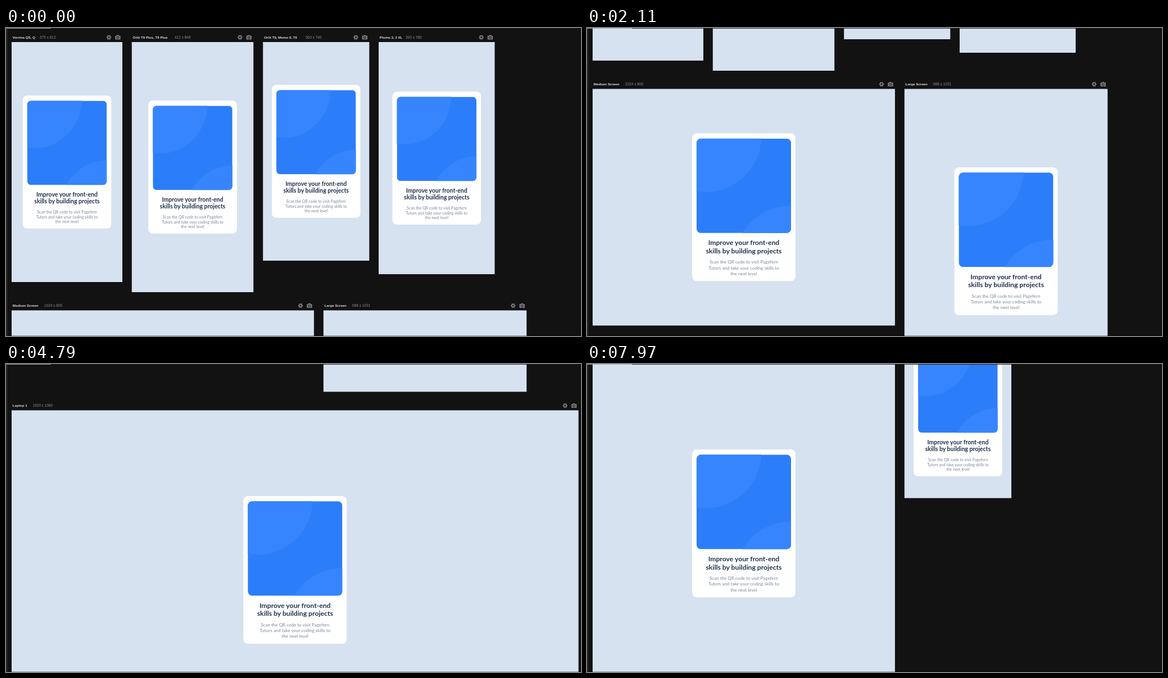
Animation, 1023 px wide and 548 px high, one loop 8 s. Source, as an HTML page:

```html
<!DOCTYPE html>
<html lang="en">
<head>
<meta charset="utf-8">
<title>Responsive preview</title>
<style>
  html, body { margin: 0; width: 100%; height: 100%; overflow: hidden; background: #121212; }
  svg { display: block; width: 1023px; height: 548px; }
  .name, .size { font: bold 6.2px "Liberation Sans", Arial, sans-serif; fill: #dcdcdc; }
  .size { font-weight: normal; font-size: 6.5px; fill: #8b8b8b; }
  .heading, .copy { font-family: Lato, sans-serif; text-anchor: middle; }
  .heading { font-weight: bold; fill: #1f314f; }
  .copy { fill: #7b879d; }
  .icon { fill: #787878; }
</style>
</head>
<body>
<svg xmlns="http://www.w3.org/2000/svg">
  <defs>
    <g id="gear" class="icon">
      <circle r="2.4" fill="none" stroke="#787878" stroke-width="1.9"/>
      <circle r="3.7" fill="none" stroke="#787878" stroke-width="1.3" pathLength="12" stroke-dasharray="1 1" stroke-dashoffset=".5"/>
    </g>
    <g id="camera" class="icon">
      <path d="M-4-3h2l1-1.2h2l1 1.2h2q.7 0 .7.7v5.6q0 .7-.7.7h-8q-.7 0-.7-.7v-5.6q0-.7.7-.7z"/>
      <circle cy=".5" r="2.3" fill="#121212"/>
      <circle cy=".5" r="1.4"/>
    </g>
    <clipPath id="rounded"><rect width="100" height="100" rx="4.8"/></clipPath>
    <g id="panel" clip-path="url(#rounded)">
      <rect width="100" height="100" fill="#2c7dfa"/>
      <g fill="#3685ff">
        <circle cx="10" cy="-2" r="58.5"/>
        <circle cx="99.5" cy="129.3" r="58.5"/>
      </g>
    </g>
  </defs>
  <g id="world"></g>
  <path d="M1.5 0V548" stroke="#3a3a3a"/>
  <path d="M0 .5H1023" stroke="#1c1c1c"/>
  <path d="M0 .5H80" stroke="#a5a5a5"/>
  <path d="M0 547.5H1023" stroke="#000" stroke-opacity=".35"/>
</svg>
<script>
const SCALE = 0.5253, TICK = 87.65, LOOP = 8000;
const world = document.getElementById('world');

const HEADING = ['Improve your front-end', 'skills by building projects'];
const COPY = ['Scan the QR code to visit Pagefern', 'Tutors and take your coding skills to', 'the next level'];

// Card metrics; text blocks are [first baseline, line height, font size]
const SMALL = { w: 157.6, h: 236.5, pw: 141.5, ph: 149.8, heading: [179.6, 12.5, 10.5], copy: [210, 8.4, 7] };
const BIG = { w: 183.9, h: 262.9, pw: 168.2, ph: 168.2, heading: [198.6, 14.8, 12.2], copy: [232, 10.25, 8.04] };

// name, x, y, device width, device height, x of the size label, card
const screens = [
  ['Vorrina QS, Q', 10, 25, 375, 812, 60, SMALL],
  ['Orlit T9 Plus, T8 Plus', 223.8, 25, 412, 846, 300, SMALL],
  ['Orlit T9, Memo 8, T8', 457.2, 25, 360, 740, 533, SMALL],
  ['Plumo 3, 3 XL', 663, 25, 393, 786, 711, SMALL],
  ['Medium Screen', 10, 502.4, 1024, 800, 68, BIG],
  ['Large Screen', 564.8, 502.4, 688, 1031, 616, BIG],
  ['Laptop 1', 10, 1077.4, 1920, 1080, 47.3, BIG],
  ['Tabra Pro (12.9-inch)', 10, 1677.6, 1024, 1366, 81, BIG],
  ['Vorrina 5/QE', 564.8, 1677.6, 362, 596, 612.5, SMALL],
];

const textBlock = (cls, lines, [top, step, size], x) => lines.map((line, i) =>
  `<text class="${cls}" x="${x}" y="${top + i * step}" font-size="${size}">${line}</text>`).join('');

function cardMarkup(c, x, y) {
  const px = (c.w - c.pw) / 2;
  return `<g transform="translate(${x} ${y})">
    <rect width="${c.w}" height="${c.h}" rx="8" fill="#fff"/>
    <use href="#panel" transform="translate(${px} 9.2) scale(${c.pw / 100} ${c.ph / 100})"/>
    ${textBlock('heading', HEADING, c.heading, c.w / 2)}
    ${textBlock('copy', COPY, c.copy, c.w / 2)}</g>`;
}

function screenMarkup([name, x, y, dw, dh, sizeX, card]) {
  const w = dw * SCALE, h = Math.ceil(dh * SCALE);
  return `<text class="name" x="${x + 1.8}" y="${y - 6.3}">${name}</text>
    <text class="size" x="${sizeX}" y="${y - 6.3}">${dw} x ${dh}</text>
    <use href="#gear" x="${x + w - 23.9}" y="${y - 8.4}"/>
    <use href="#camera" x="${x + w - 8}" y="${y - 8.4}"/>
    <rect x="${x}" y="${y}" width="${w}" height="${h}" fill="#d6e2f0"/>
    ${cardMarkup(card, x + (w - card.w) / 2, y + (h - card.h) / 2)}`;
}

world.innerHTML = screens.map(screenMarkup).join('');

// Wheel bursts: first step, last step, number of steps, wheel ticks, first distance
const bursts = [
  [500, 960, 7, 2], [1290, 1430, 3, 1, 29.7], [1700, 2180, 8, 2], [2380, 2780, 6, 2],
  [3030, 3180, 3, 1, 19.5], [3380, 3520, 3, 1], [4180, 4920, 10, 3, 21.1], [4990, 5120, 3, 1],
  [5390, 5530, 3, 1], [5860, 6070, 4, 1], [6270, 6830, 8, 2], [7360, 7700, 6, 2], [7840, 7970, 3, 1],
];

function scrollAt(t) {
  let y = 0;
  for (const [start, end, steps, ticks, lead] of bursts) {
    if (t < start) break;
    const i = Math.min(steps - 1, Math.floor((t - start) / (end - start) * (steps - 1) + 1e-6));
    const u = (i + 1) * ticks / steps, f = u % 1;
    y += i === 0 && lead ? lead : TICK * (u - f + f * f * (3 - 2 * f));
  }
  return Math.round(y);
}

function draw() {
  world.setAttribute('transform', `translate(0 ${-scrollAt(performance.now() % LOOP)})`);
  requestAnimationFrame(draw);
}
draw();
</script>
</body>
</html>
```
